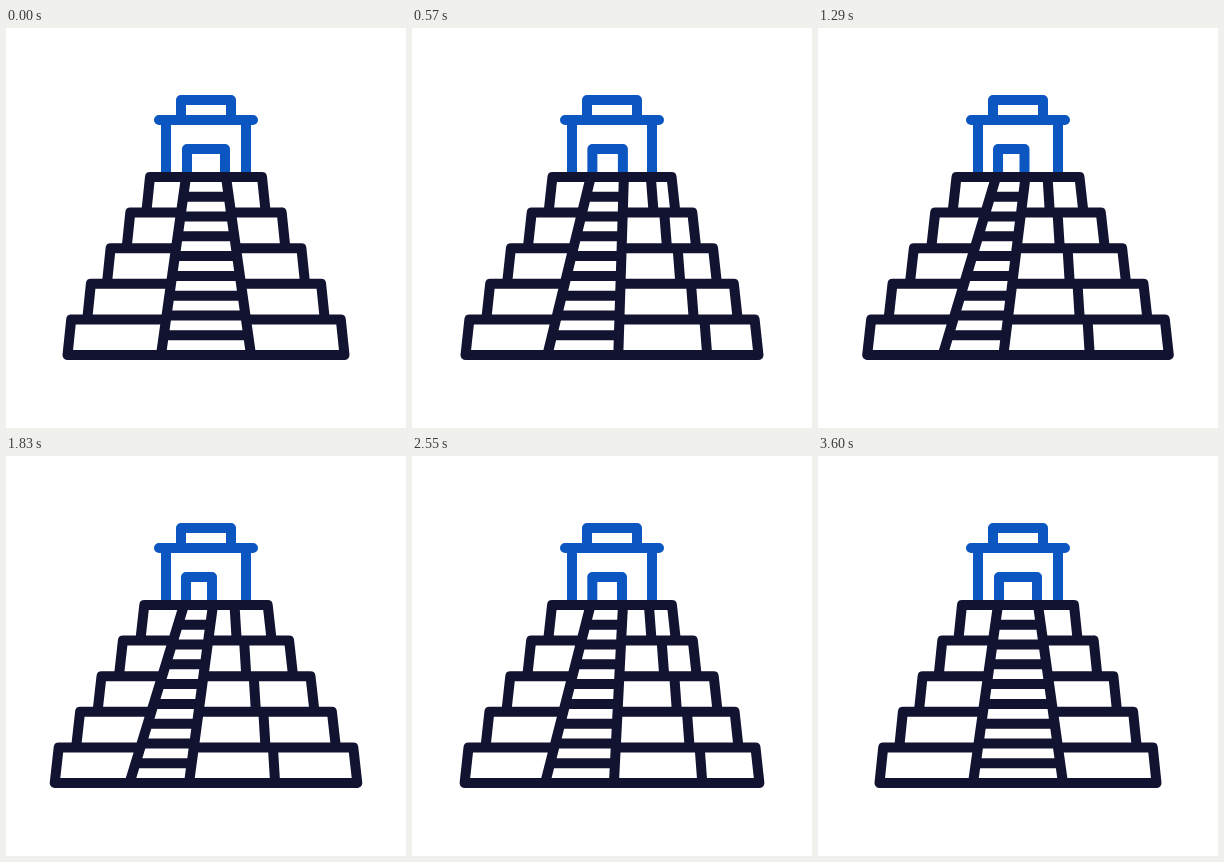
Write an HTML page that moves like this. It is 400 px wide and 400 px high and loops after 3630 ms.

```html
<!DOCTYPE html>
<html lang="en">
<head>
<meta charset="utf-8">
<title>Step pyramid</title>
<style>
  html, body { margin: 0; width: 100%; height: 100%; overflow: hidden; background: #fff; }
  svg { display: block; width: 100vw; height: 100vh; }
  path { fill: none; stroke-width: 10; stroke-linecap: round; stroke-linejoin: round; }
  .temple { stroke: #0b56c0; }
  .pyramid { stroke: #121331; }
</style>
</head>
<body>
<svg viewBox="0 0 400 400">
  <path class="temple" d="M175 92V72H225V92M153 92H247M160 92V147M240 92V147"/>
  <path class="temple" id="door"/>
  <path class="pyramid" id="pyramid"/>
</svg>
<script>
const LOOP = 3630, HALF = 1800, STEP = 30;
const TOP = 149, BASE = 327, LEVELS = 5, STAIRS = 9;
const door = document.getElementById('door');
const pyramid = document.getElementById('pyramid');

const mix = (a, b, p) => a + (b - a) * p;
const line = (x1, y1, x2, y2) =>
  `M${x1.toFixed(2)} ${y1.toFixed(2)}L${x2.toFixed(2)} ${y2.toFixed(2)}`;

// Cubic easing from (0,0) to (1,1) with handles (x1,0) and (x2,1)
function ease(x1, x2, x) {
  if (x <= 0) return 0;
  if (x >= 1) return 1;
  let lo = 0, hi = 1, s;
  for (let i = 0; i < 30; i++) {
    s = (lo + hi) / 2;
    const at = 3 * s * (1 - s) * ((1 - s) * x1 + s * x2) + s ** 3;
    if (at < x) lo = s; else hi = s;
  }
  return s * s * (3 - 2 * s);
}

function turn(t) {
  return t < HALF ? ease(0.29, 0.07, t / HALF)
                  : 1 - ease(0.6, 0.4, (t - HALF) / HALF);
}

function draw(p) {
  const height = (BASE - TOP) / LEVELS;
  const stairLeft = y => mix(mix(180, 178, p), mix(155, 123.5, p), (y - TOP) / (BASE - TOP));
  const stairRight = y => mix(mix(220, 207, p), mix(245, 183, p), (y - TOP) / (BASE - TOP));
  let d = line(stairLeft(TOP), TOP, stairLeft(BASE), BASE) +
          line(stairRight(TOP), TOP, stairRight(BASE), BASE);

  for (let i = 0; i < LEVELS; i++) {
    const y = TOP + i * height, end = y + height;
    const half = mix(56 + 19.7 * i, 61.7 + 21.4 * i, p);
    const foot = half + mix(3.7, 4, p);
    const corner = mix(256 + 19.7 * i, 228.5 + 9.6 * i, p);
    const innerLeft = i ? stairLeft(y) : 200, innerRight = i ? stairRight(y) : 200;
    d += `M${innerLeft} ${y}L${200 - half} ${y}L${200 - foot} ${end}`;
    d += `M${innerRight} ${y}L${200 + half} ${y}L${200 + foot} ${end}`;
    d += line(corner, y, corner + mix(3.7, 2.2, p), end);
    if (i === LEVELS - 1) d += `L${200 + foot} ${end}L${200 - foot} ${end}`;
  }
  for (let k = 1; k < STAIRS; k++) {
    const y = TOP + k * (BASE - TOP) / STAIRS;
    d += line(stairLeft(y), y, stairRight(y), y);
  }
  pyramid.setAttribute('d', d);
  door.setAttribute('d', `M${mix(181, 180, p)} 147V121H${mix(219, 206, p)}V147`);
}

const start = performance.now();
function tick(now) {
  const t = Math.max(0, now - start) % LOOP;
  draw(turn(Math.floor(t / STEP) * STEP));
  requestAnimationFrame(tick);
}
draw(0);
requestAnimationFrame(tick);
</script>
</body>
</html>
```
